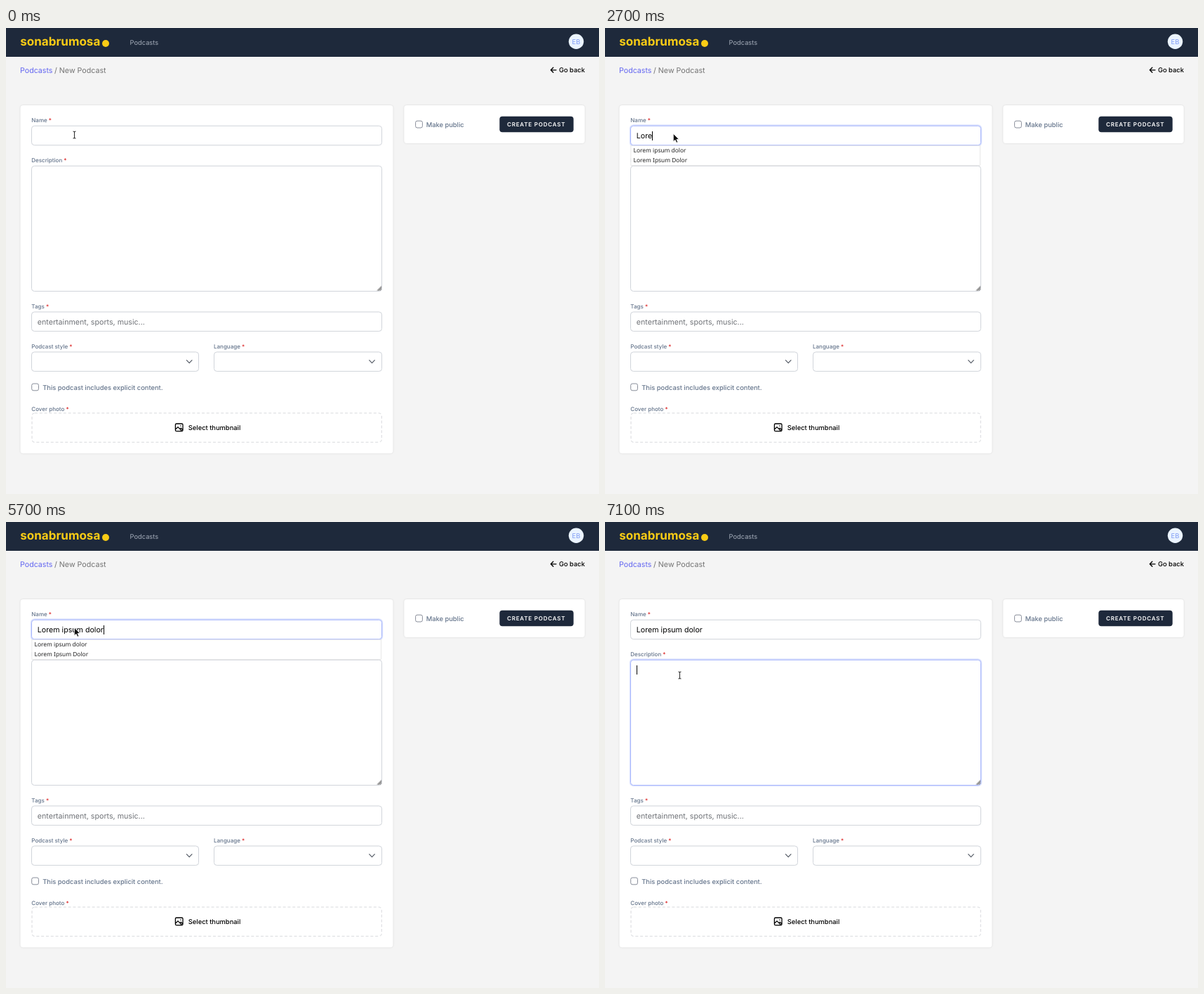
An HTML page for the animation above (8000 ms loop, 845 px wide and 663 px high).

```html
<!DOCTYPE html>
<html lang="en">
<head>
<meta charset="utf-8">
<title>New Podcast</title>
<style>
  html, body { margin: 0; width: 100%; height: 100%; overflow: hidden; background: #f4f4f4; }
  svg { display: block; width: 845px; height: 663px; }
  text { font: 400 10.67px Inter, sans-serif; text-rendering: geometricPrecision; white-space: pre; }
  .label { font-size: 8px; font-weight: 500; fill: #64748b; }
  .label tspan { fill: #dc2626; }
  .ui { font-size: 9.33px; font-weight: 500; }
  .slate { fill: #64748b; }
  .gray { fill: #737373; }
  .brand { font-size: 17px; font-weight: 700; fill: #facc15; }
  .button { font-size: 8px; font-weight: 600; letter-spacing: .8px; fill: #fff; }
  .option { font: 8.4px "Noto Sans", "Open Sans", sans-serif; fill: #222; }
  .card { fill: #fff; filter: drop-shadow(0 .7px 1px rgba(0, 0, 0, .13)); }
  .field { fill: #fff; stroke: #d1d5db; filter: drop-shadow(0 .7px .6px rgba(0, 0, 0, .06)); }
  .field.focus { stroke: #a5b4fc; }
  .ring { fill: none; stroke: #c7d2fe; stroke-opacity: .6; stroke-width: 2; }
  .check { fill: #fff; stroke: #6b7280; stroke-width: .8; }
  .line { fill: none; stroke: #000; stroke-width: 1.3; stroke-linecap: round; stroke-linejoin: round; }
  .chevron { stroke: #555b66; stroke-width: 1.2; }
  .hidden { display: none; }
</style>
</head>
<body>
<svg viewBox="0 0 845 663">
  <defs>
    <path id="chevron" class="line chevron" d="M-3.8-2L0 2L3.8-2"/>
    <rect id="check" class="check" x=".4" y=".4" width="9.8" height="9.8" rx="2.4"/>
  </defs>
  <rect width="845" height="663" fill="#f4f4f4"/>

  <rect width="845" height="41" fill="#1e293b"/>
  <text class="brand" x="20.3" y="24.5">sonabrumosa</text>
  <circle cx="142" cy="22" r="5" fill="#facc15"/>
  <text class="ui" x="176.5" y="23.7" style="font-weight:400" fill="#a3abb8">Podcasts</text>
  <circle cx="812.5" cy="19.3" r="10.7" fill="#ebf4ff"/>
  <text class="ui" x="812.4" y="22.9" text-anchor="middle" style="font-weight:400" fill="#7f9cf5">EB</text>

  <text x="20" y="63.6" fill="#6366f1">Podcasts</text>
  <text class="gray" x="69" y="63.6">/ New Podcast</text>
  <path class="line" d="M784 59.8H776.5M779.8 56.3L776.3 59.8L779.8 63.3"/>
  <text class="ui" x="788" y="63.4">Go back</text>

  <rect class="card" x="20.5" y="110" width="531" height="495.3" rx="4"/>
  <rect class="card" x="567.3" y="110" width="257.4" height="54" rx="4"/>
  <use href="#check" x="583.2" y="131.8"/>
  <text class="ui slate" x="598.7" y="140.8">Make public</text>
  <rect x="703.3" y="125.8" width="105.4" height="22.4" rx="4" fill="#1e293b"/>
  <text class="button" x="714" y="140.2">CREATE PODCAST</text>

  <text class="label" x="36.3" y="134.2">Name<tspan> *</tspan></text>
  <text class="label" x="36.3" y="191.2">Description<tspan> *</tspan></text>
  <text class="label" x="36.3" y="399.2">Tags<tspan> *</tspan></text>
  <text class="label" x="36.3" y="456.2">Podcast style<tspan> *</tspan></text>
  <text class="label" x="296" y="456.2">Language<tspan> *</tspan></text>
  <text class="label" x="36.3" y="544.8">Cover photo<tspan> *</tspan></text>

  <g id="descBox">
    <rect class="ring" x="35.7" y="195.2" width="500.6" height="180" rx="5"/>
    <rect class="field" x="36.5" y="196.3" width="499" height="178.2" rx="4"/>
    <path d="M528 373.5L535 366.5V371.5L533 373.5Z" fill="#aaa"/>
    <path d="M530 374L535.2 368.8M532.5 374L535.2 371.3" stroke="#777" stroke-width=".8"/>
  </g>
  <g id="nameBox">
    <rect class="ring" x="35.7" y="138.2" width="500.6" height="29.6" rx="5"/>
    <rect class="field" x="36.5" y="139.3" width="499" height="27.4" rx="4"/>
  </g>
  <rect class="field" x="36.5" y="404" width="499" height="27.4" rx="4"/>
  <text x="44.8" y="421.6" fill="#6f7277">entertainment, sports, music...</text>
  <rect class="field" x="36.5" y="461" width="238" height="27.4" rx="4"/>
  <rect class="field" x="296.5" y="461" width="239" height="27.4" rx="4"/>
  <use href="#chevron" x="261.2" y="474.7"/>
  <use href="#chevron" x="521.5" y="474.7"/>
  <use href="#check" x="36.3" y="505.6"/>
  <text class="ui slate" x="52.2" y="514.6">This podcast includes explicit content.</text>

  <rect x="37" y="547.8" width="498.3" height="41.5" rx="4" fill="none" stroke="#e0e1e4" stroke-width="1.3" stroke-dasharray="4 2.8"/>
  <path class="line" d="M243 563H250.4Q252 563 252 564.6V572Q252 573.6 250.4 573.6H243Q241.4 573.6 241.4 572V564.6Q241.4 563 243 563ZM241.6 571L245 567.6L250.6 573.4M248 570.6L249.3 569.3L252 572"/>
  <circle cx="248.9" cy="566" r=".8"/>
  <text class="ui" x="259.8" y="571.6">Select thumbnail</text>

  <text id="name" x="44.8" y="156.9"></text>
  <rect id="caret" x="45" width="1" height="13"/>

  <g id="popup">
    <rect id="panel" x="36.9" y="167.3" width="497.7" fill="#fff" stroke="#dedede" stroke-width=".7"/>
    <rect id="marked" x="37.5" width="496" height="13.3" fill="#d9d9d9"/>
    <rect id="thumb" x="527.6" y="170" width="4.4" height="35" rx="1.5" fill="#58585a"/>
    <g id="options"></g>
  </g>

  <path id="arrow" d="M0 0V11.4L2.7 9L4.5 13L6.5 12.1L4.7 8.2H8.2Z" fill="#111" stroke="#fff" stroke-width=".8" stroke-linejoin="round"/>
  <path id="beam" d="M-2-5Q0-5 0-4Q0-5 2-5M0-4V4M-2 5Q0 5 0 4Q0 5 2 5" fill="none" stroke="#333" stroke-width="1.1"/>
</svg>
<script>
  const LOOP = 8000, ROW = 13.3, LIST_TOP = 167.6;
  const el = id => document.getElementById(id);
  const levels = ["Label", ...[1, 2, 3, 4, 5].map(n => "Level " + n)];
  const matches = ["Lorem ipsum dolor", "Lorem Ipsum Dolor"];
  const mixed = [...matches, "Local", "Location", "Logo", "Lock"];

  // Each entry changes part of the state at its time in ms.
  const steps = [
    [0, { name: "", focus: "", caret: false, list: [], marked: -1, pointer: "beam", at: [97.5, 152] }],
    [700, { focus: "name", caret: true }],
    [1700, { caret: false }],
    [2100, { name: "L", caret: true, pointer: "arrow", at: [97.3, 150.3] }],
    [2200, { list: levels }],
    [2400, { name: "Lo", list: mixed }],
    [2700, { name: "Lore", list: matches }],
    [2900, { name: "Lorem" }],
    [3100, { name: "Lorem " }],
    [3400, { name: "Lorem i" }],
    [3900, { name: "Lorem ip" }],
    [4200, { name: "Lorem ips" }],
    [4300, { name: "Lorem ipsu" }],
    [4600, { name: "Lorem ipsum" }],
    [4900, { name: "Lorem ipsum " }],
    [5000, { name: "Lorem ipsum d" }],
    [5100, { name: "Lorem ipsum do" }],
    [5300, { name: "Lorem ipsum dol" }],
    [5500, { name: "Lorem ipsum dolo" }],
    [5700, { name: "Lorem ipsum dolor" }],
    [6600, { at: [99, 160] }],
    [6700, { at: [105, 183], marked: 1, caret: false }],
    [6800, { at: [108.3, 196] }],
    [6900, { at: [108, 209] }],
    [7000, { pointer: "beam", at: [106.5, 218] }],
    [7100, { focus: "desc", caret: true, list: [], marked: -1 }]
  ];

  const show = (node, on) => node.classList.toggle("hidden", !on);

  function focusBox(id, on) {
    const [ring, field] = el(id).querySelectorAll("rect");
    show(ring, on);
    field.classList.toggle("focus", on);
  }

  function drawList(list, marked) {
    show(el("popup"), list.length);
    show(el("thumb"), list.length > 2);
    show(el("marked"), marked >= 0);
    el("panel").setAttribute("height", list.length * ROW + 1.4);
    el("marked").setAttribute("y", LIST_TOP + marked * ROW);
    el("options").innerHTML = list.map((label, i) =>
      `<text class="option" x="40.6" y="${LIST_TOP + 9.6 + i * ROW}">${label}</text>`).join("");
  }

  function draw(s) {
    const name = el("name"), caret = el("caret"), inName = s.focus === "name";
    focusBox("nameBox", inName);
    focusBox("descBox", s.focus === "desc");
    name.textContent = s.name;
    const width = inName && s.name ? name.getComputedTextLength() : 0;
    caret.setAttribute("x", Math.round(44.8 + width));
    caret.setAttribute("y", inName ? 147 : 204);
    show(caret, s.caret);
    drawList(s.list, s.marked);
    for (const id of ["arrow", "beam"]) {
      show(el(id), s.pointer === id);
      el(id).setAttribute("transform", `translate(${s.at})`);
    }
  }

  const start = performance.now();
  let shown = -1;
  function tick() {
    const t = (performance.now() - start) % LOOP;
    const past = steps.filter(([time]) => time <= t);
    if (past.length !== shown) {
      shown = past.length;
      draw(Object.assign({}, ...past.map(([, change]) => change)));
    }
    requestAnimationFrame(tick);
  }
  tick();
</script>
</body>
</html>
```
